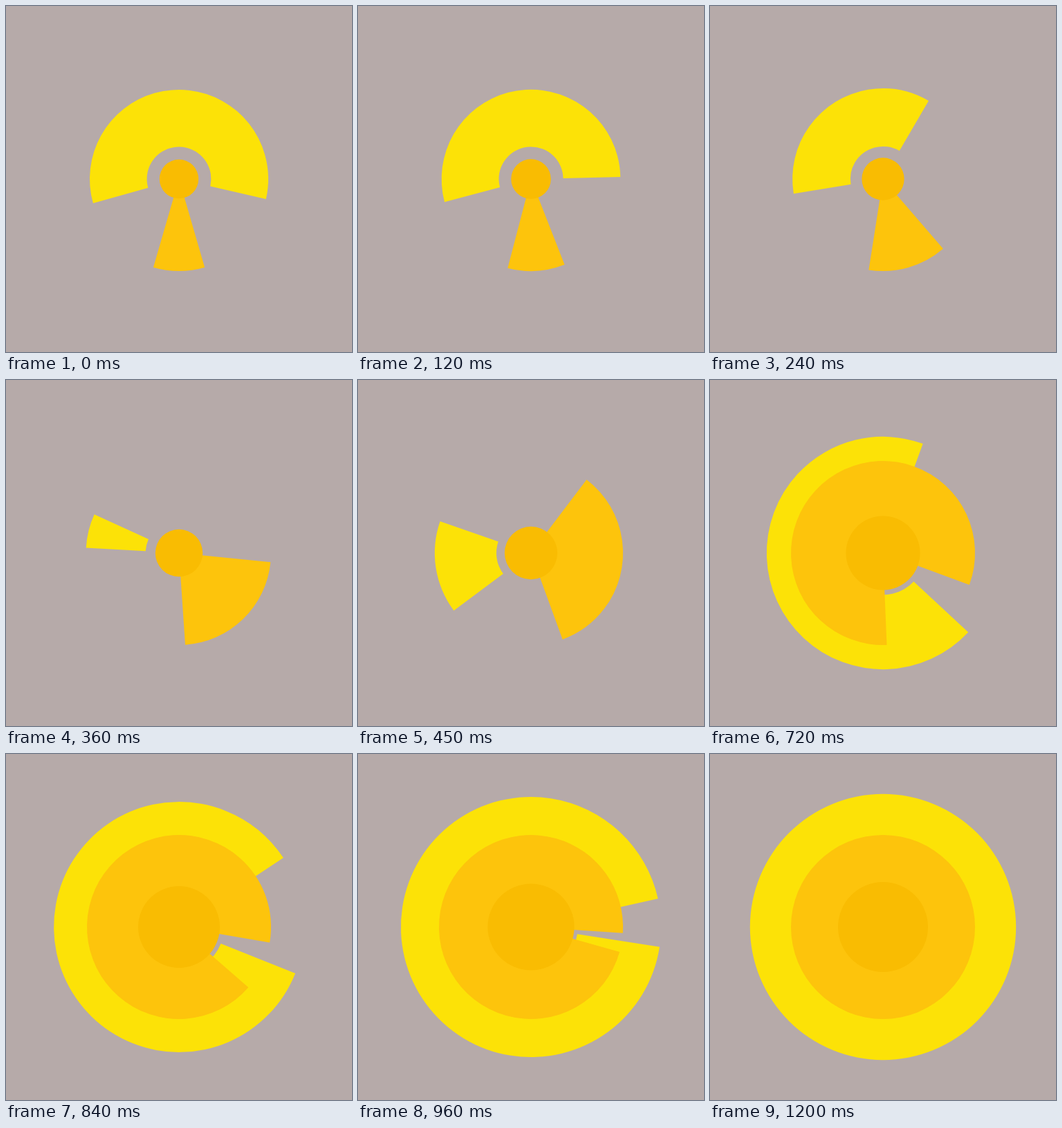
Animation, 500 px wide and 500 px high, one loop 2.73 s. Source, as an HTML page with a canvas:

```html
<!DOCTYPE html>
<html lang="en">
<head>
<meta charset="utf-8">
<title>Opening rings</title>
<style>
  html, body { margin: 0; width: 100%; height: 100%; overflow: hidden; background: #b6aaa9; }
  canvas { display: block; }
</style>
</head>
<body>
<canvas id="stage" width="500" height="500"></canvas>
<script>
const ctx = document.getElementById('stage').getContext('2d');
const LOOP = 2730, MOVE = 1200, STEP = 30, RING_DELAY = 39;
const C = 250, RAD = Math.PI / 180;

// cubic-bezier(x1, 0, x2, 1), solved by bisection
function ease(x, x1, x2) {
  if (x <= 0) return 0;
  if (x >= 1) return 1;
  let lo = 0, hi = 1, s;
  for (let i = 0; i < 30; i++) {
    s = (lo + hi) / 2;
    const u = 1 - s;
    if (3 * u * u * s * x1 + 3 * u * s * s * x2 + s * s * s < x) lo = s;
    else hi = s;
  }
  return s * s * (3 - 2 * s);
}

const tween = (from, to, x, x1, x2) => from + (to - from) * ease(x, x1, x2);

// Sector between two angles in degrees, given in any order
function sector(color, a, b, outer, inner = 0) {
  const from = Math.min(a, b) * RAD, to = Math.max(a, b) * RAD;
  ctx.fillStyle = color;
  ctx.beginPath();
  ctx.arc(C, C, outer, from, to);
  if (inner) ctx.arc(C, C, inner, to, from, true);
  else ctx.lineTo(C, C);
  ctx.fill();
}

function draw(ms) {
  const x = Math.min(1, ms / MOVE);
  const late = (ms - RING_DELAY) / (MOVE - RING_DELAY);

  ctx.fillStyle = '#b6aaa9';
  ctx.fillRect(0, 0, 500, 500);

  const ring = tween(129, 192.2, late, 0.64, 0.46);
  sector('#fce207',
    tween(373, 0, x, 0.332, 0.188),
    tween(164.2, 360, late, 0.605, 0.46),
    ring, ring * 0.36);

  sector('#fdc40c',
    tween(106.2, 0, x, 0.518, 0.318),
    tween(73.8, -360, x, 0.567, 0.318),
    133);

  sector('#f9bc02', 0, 360, tween(28.2, 65, x, 0.49, 0.51));
}

function tick(now) {
  draw(Math.floor((now % LOOP) / STEP) * STEP);
  requestAnimationFrame(tick);
}
draw(0);
requestAnimationFrame(tick);
</script>
</body>
</html>
```
